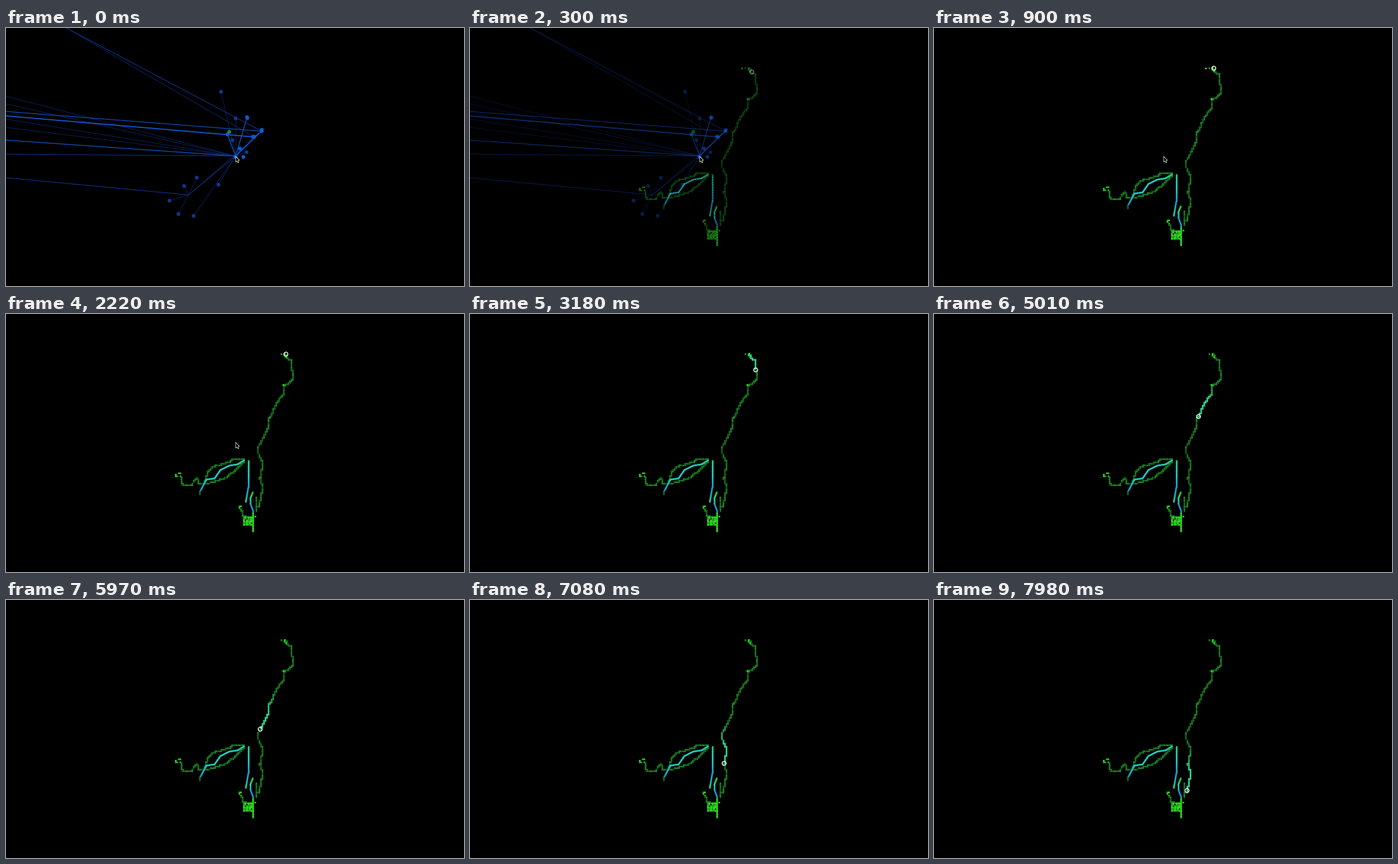
Recreate the animation shown at these times as a matplotlib script. Size 720 by 405 pixels, loop 8000 ms.

```python
import random

import matplotlib.pyplot as plt
import numpy as np
from matplotlib.animation import FuncAnimation
from matplotlib.collections import LineCollection
from matplotlib.patches import Circle, Polygon

W, H, DPI = 720, 405, 100
FRAMES, STEP = 250, 32
PX = 72 / DPI
CELL = 2.4
random.seed(4)

plt.rcParams["toolbar"] = "None"
fig = plt.figure(figsize=(W / DPI, H / DPI), dpi=DPI, facecolor="black")
ax = fig.add_axes([0, 0, 1, 1])
ax.set_xlim(0, W)
ax.set_ylim(H, 0)
ax.axis("off")


def rgb(*c):
    return np.array(c) / 255


def ramp(t, t0, t1):
    return float(np.clip((t - t0) / (t1 - t0), 0, 1))


def walk(pts):
    """Return the running step distance and a point-at-distance function."""
    pts = np.array(pts, float)
    dist = np.r_[0, np.cumsum(np.abs(np.diff(pts, axis=0)).sum(axis=1))]
    return dist, lambda s: np.array([np.interp(s, dist, pts[:, k]) for k in (0, 1)])


# --- network -------------------------------------------------------------
HUB, FORK = (361, 201), (287, 262)
DIM, MID, BRIGHT = rgb(15, 34, 95), rgb(16, 50, 140), rgb(18, 84, 200)
right = [(402, 162), (390, 171), (379, 140), (348, 167)]
twigs = [(338, 100), (361, 142), (295, 295), (334, 246), (356, 176), (378, 195)]
leaves = [(300, 235), (280, 248), (257, 271), (271, 292)]

links = [(HUB, (0, y), DIM, 0.9) for y in (107, 119, 143, 156)]
links += [(HUB, p, DIM, 0.9) for p in twigs] + [(FORK, p, DIM, 0.9) for p in leaves]
links += [(HUB, p, BRIGHT, 1.3) for p in right]
links += [(right[0], (95, 0), MID, 1.1), (right[1], (95, 0), DIM, 1),
          (right[0], (0, 131), BRIGHT, 1.1), (right[1], (0, 138), BRIGHT, 1.8),
          (HUB, (0, 176), BRIGHT, 1.2), (HUB, (0, 198), MID, 1),
          (FORK, (0, 235), MID, 1.1), (FORK, HUB, MID, 1),
          (FORK, right[0], DIM, 0.9), (right[0], right[1], BRIGHT, 1.6)]
ends_a, ends_b, tones, widths = zip(*links)
net_lines = ax.add_collection(LineCollection(
    list(zip(ends_a, ends_b)), colors=tones, linewidths=np.array(widths) * PX))

around = [(x + random.gauss(0, 2), y + random.gauss(0, 3))
          for x, y in [HUB, HUB, (366, 188), (370, 205), right[0], right[1], right[2]]]
nodes = twigs + leaves + right + around + [(351, 163)]
faint = len(twigs + leaves)
tints = [rgb(14, 56, 138)] * faint + [rgb(18, 88, 205)] * (len(nodes) - faint - 1)
net_nodes = ax.scatter(*zip(*nodes), c=tints + [rgb(24, 140, 60)],
                       s=(6 * PX) ** 2, linewidths=0, zorder=2)

# --- dotted map ----------------------------------------------------------
ROUTE = [(440, 63), (441, 68), (449, 74), (449, 88), (451, 90), (451, 102),
         (442, 110), (436, 113), (436, 126), (424, 142), (417, 160), (413, 163),
         (413, 177), (399, 204), (397, 208), (397, 219), (404, 235), (399, 259),
         (401, 263), (404, 272), (401, 285), (399, 295), (397, 302)]
BRANCHES = [
    [(276, 256), (276, 266), (280, 270), (290, 270), (301, 257), (304, 267),
     (322, 265), (344, 258), (364, 243), (374, 231)],
    [(312, 264), (318, 247), (324, 240), (350, 233), (356, 229), (374, 229)],
    [(304, 278), (304, 284)],
    [(393, 287), (393, 310)],
    [(370, 307), (373, 317), (380, 319)],
]
# left, top, right, bottom, share of cells filled
CLUSTERS = [(433, 63, 444, 70, 0.55), (267, 250, 276, 256, 0.6),
            (367, 302, 373, 308, 0.6), (374, 319, 388, 331, 0.9),
            (436, 109, 441, 113, 0.6), (392, 318, 394, 325, 0.6)]

dots, shades, along = [], [], []


def add_dot(x, y, color, s=-1e4):
    dots.append((x, y))
    shades.append(color * random.uniform(0.75, 1.2))
    along.append(s)


def add_track(pts, on_route=False):
    dist, at = walk(pts)
    seen = {}
    for s in np.arange(0, dist[-1] + 0.1, 0.6):
        seen.setdefault(tuple(np.round(at(s) / CELL)), s)
    for (i, j), s in seen.items():
        add_dot(i * CELL, j * CELL, rgb(26, 122, 32), s if on_route else -1e4)


add_track(ROUTE, on_route=True)
for branch in BRANCHES:
    add_track(branch)
for x0, y0, x1, y1, share in CLUSTERS:
    for x in np.arange(x0, x1 + 0.1, CELL):
        for y in np.arange(y0, y1 + 0.1, CELL):
            if random.random() < share:
                add_dot(x, y, rgb(42, 205, 32))
shades, along = np.array(shades), np.array(along)
dot_art = ax.scatter(*zip(*dots), marker="o", s=(2.9 * PX) ** 2, linewidths=0, zorder=3)
spark = ax.scatter([427], [63], s=(2.6 * PX) ** 2, c=[rgb(150, 225, 170)],
                   linewidths=0, zorder=4)

# --- glowing lines -------------------------------------------------------
CYAN, BLUE = rgb(36, 200, 195), rgb(26, 145, 205)
TEAL, GREEN = rgb(36, 205, 145), rgb(42, 215, 30)
FLOWS = [
    ([(306, 277), (315, 260), (328, 258), (337, 245), (351, 238), (364, 236),
      (374, 230)], [BLUE, CYAN, CYAN, CYAN, TEAL]),
    ([(381, 230), (381, 272), (377, 295)], [TEAL, CYAN, BLUE, TEAL]),
    ([(388, 280), (384, 290), (384, 297), (388, 308), (388, 312)],
     [GREEN, TEAL, BLUE, BLUE]),
    ([(388, 312), (388, 341)], [GREEN, GREEN]),
]
segs, seg_cols = [], []
for pts, stops in FLOWS:
    dist, at = walk(pts)
    grid = np.union1d(dist, np.arange(0, dist[-1], 4))
    for a, b in zip(grid, grid[1:]):
        k = (a + b) / 2 / dist[-1] * (len(stops) - 1)
        lo = int(k)
        segs.append([at(a), at(b)])
        seg_cols.append(stops[lo] + (stops[lo + 1] - stops[lo]) * (k - lo))
flow = ax.add_collection(LineCollection(
    segs, colors=seg_cols, linewidths=2.6 * PX, capstyle="round", zorder=3.5))

# --- ring and pointer ----------------------------------------------------
ring = ax.add_patch(Circle((0, 0), 3.1, fill=False, ec="white", lw=1.3 * PX, zorder=6))
ARROW = np.array([(0, 0), (0, 9), (2, 7.3), (3.6, 10), (5, 9.4), (3.8, 6.6), (6, 6.2)])
pointer = ax.add_patch(Polygon(ARROW, closed=True, fc="black", lw=0.9 * PX, zorder=7))

# the ring hovers between three spots, then follows the route at a steady pace
A, B, C = (436, 67), (443, 69), ROUTE[0]
HOVER_T = [720, 800, 900, 1080, 1110, 1290, 1380, 1470]
HOVER = np.array([B, A, C, C, A, A, B, C])
START, SPEED, TRAIL = 2610, 0.0605, 85
_, route_at = walk(ROUTE)


def draw(i):
    t = i * STEP
    show = ramp(t, 30, 570)
    for art in (net_lines, net_nodes):
        art.set_alpha(1 - show)
    for art in (flow, ring):
        art.set_alpha(show)
    spark.set_alpha(show * (1 - ramp(t, 1290, 1470)))

    head = (t - START) * SPEED
    if head > 0:
        ring.center = route_at(head)
    else:
        ring.center = [np.interp(t, HOVER_T, HOVER[:, k]) for k in (0, 1)]

    # the trail stays bright, then sinks back into the dotted path
    age = head - along
    glow = np.where(age >= 0, np.clip((TRAIL - age) / 45, 0, 1), 0)[:, None]
    color = shades * (1 - glow) + rgb(52, 218, 155) * glow
    dot_art.set_facecolors(np.c_[np.clip(color, 0, 1), np.full(len(color), show)])

    u = ramp(t, 2400, 2900)
    u = u * u * (3 - 2 * u)
    pointer.set_xy(ARROW + (361 - 249 * u, 201.5 + 174 * u))
    pointer.set_edgecolor(rgb(215, 225, 165) * (1 - show) + rgb(190, 205, 195) * show)
    pointer.set_visible(t < 3000)
    return net_lines, net_nodes, dot_art, flow, spark, ring, pointer


anim = FuncAnimation(fig, draw, frames=FRAMES, interval=STEP, repeat=True,
                     repeat_delay=0, blit=False, cache_frame_data=False)
plt.show()
```
